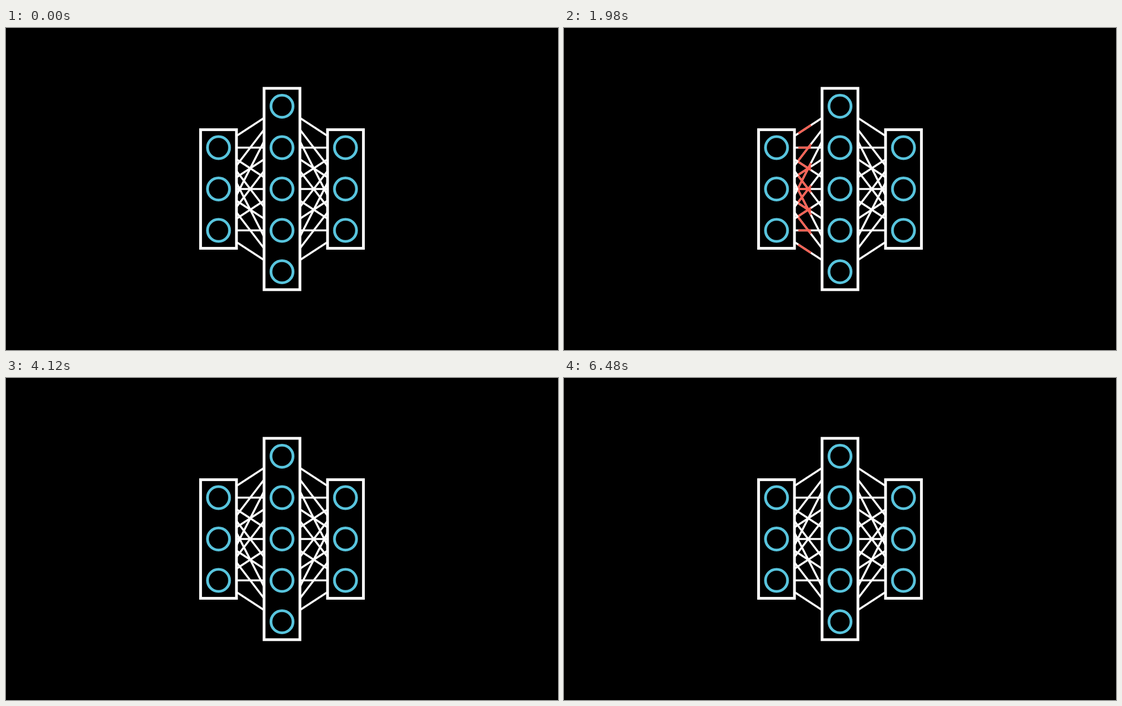
An HTML page with a canvas that plays this animation: 980 by 572 pixels, repeating every 6500 ms.

```html
<!DOCTYPE html>
<html lang="en">
<head>
<meta charset="utf-8">
<title>Forward pass</title>
<style>
  html, body { margin: 0; width: 100%; height: 100%; overflow: hidden; background: #000; }
  canvas { display: block; }
</style>
</head>
<body>
<canvas id="stage" width="980" height="572"></canvas>
<script>
const ctx = document.getElementById("stage").getContext("2d");
const W = 980, H = 572;
const UNIT = 245; // pixels per scene unit
const LOOP = 6500;
const BLUE = [88, 196, 221], RED = [252, 98, 85];
const WHITE = "#fff";

const RADIUS = 0.08 * UNIT;
const NODE_GAP = 0.3 * UNIT;
const LAYER_GAP = 0.46 * UNIT;
const PAD = 0.05 * UNIT;
const OUTLINE = 0.02 * UNIT;
const EDGE = 0.015 * UNIT;

// Each layer glows for 1500 ms; each flash between layers takes 1000 ms.
const FADE = 250, GLOW = 1500, FLASH = 1000, FLASH_SPAN = 0.2;

const layers = [3, 5, 3].map((count, i) => ({
  x: W / 2 + (i - 1) * LAYER_GAP,
  ys: Array.from({ length: count }, (_, k) => H / 2 + (k - (count - 1) / 2) * NODE_GAP),
  start: i * (GLOW + FLASH)
}));

const clamp = v => Math.min(1, Math.max(0, v));
const mix = (a, b, t) => a + (b - a) * t;
const rgb = c => `rgb(${c.map(Math.round).join(",")})`;
const sigmoid = v => 1 / (1 + Math.exp(-v));

function smooth(t) {
  const edge = sigmoid(-5);
  return clamp((sigmoid(10 * (clamp(t) - 0.5)) - edge) / (1 - 2 * edge));
}

function drawEdges(from, to, lower, upper, color) {
  ctx.strokeStyle = color;
  ctx.lineWidth = EDGE;
  for (const y1 of from.ys) {
    for (const y2 of to.ys) {
      ctx.beginPath();
      ctx.moveTo(mix(from.x, to.x, lower), mix(y1, y2, lower));
      ctx.lineTo(mix(from.x, to.x, upper), mix(y1, y2, upper));
      ctx.stroke();
    }
  }
}

function drawFlash(from, to, time) {
  const t = (time - from.start - GLOW) / FLASH;
  if (t <= 0 || t >= 1) return;
  const head = smooth(t) * (1 + FLASH_SPAN);
  drawEdges(from, to, clamp(head - FLASH_SPAN), clamp(head), rgb(RED));
}

function drawLayer({ x, ys, start }, time) {
  const top = ys[0] - RADIUS - PAD;
  const left = x - RADIUS - PAD;
  const box = [left, top, 2 * (x - left), 2 * (H / 2 - top)];
  ctx.lineWidth = OUTLINE;
  ctx.fillStyle = "#000";
  ctx.fillRect(...box);
  ctx.strokeStyle = WHITE;
  ctx.strokeRect(...box);

  const age = time - start;
  const heat = smooth(age / FADE) - smooth((age - GLOW + FADE) / FADE);
  ctx.strokeStyle = rgb(BLUE.map((v, i) => mix(v, RED[i], heat)));
  for (const y of ys) {
    ctx.beginPath();
    ctx.arc(x, y, RADIUS, 0, 2 * Math.PI);
    ctx.stroke();
  }
}

function draw(time) {
  ctx.fillStyle = "#000";
  ctx.fillRect(0, 0, W, H);
  for (let i = 0; i < layers.length - 1; i++) {
    drawEdges(layers[i], layers[i + 1], 0, 1, WHITE);
    drawFlash(layers[i], layers[i + 1], time);
  }
  for (const layer of layers) drawLayer(layer, time);
}

const begin = performance.now();
function tick() {
  draw((performance.now() - begin) % LOOP);
  requestAnimationFrame(tick);
}
tick();
</script>
</body>
</html>
```
